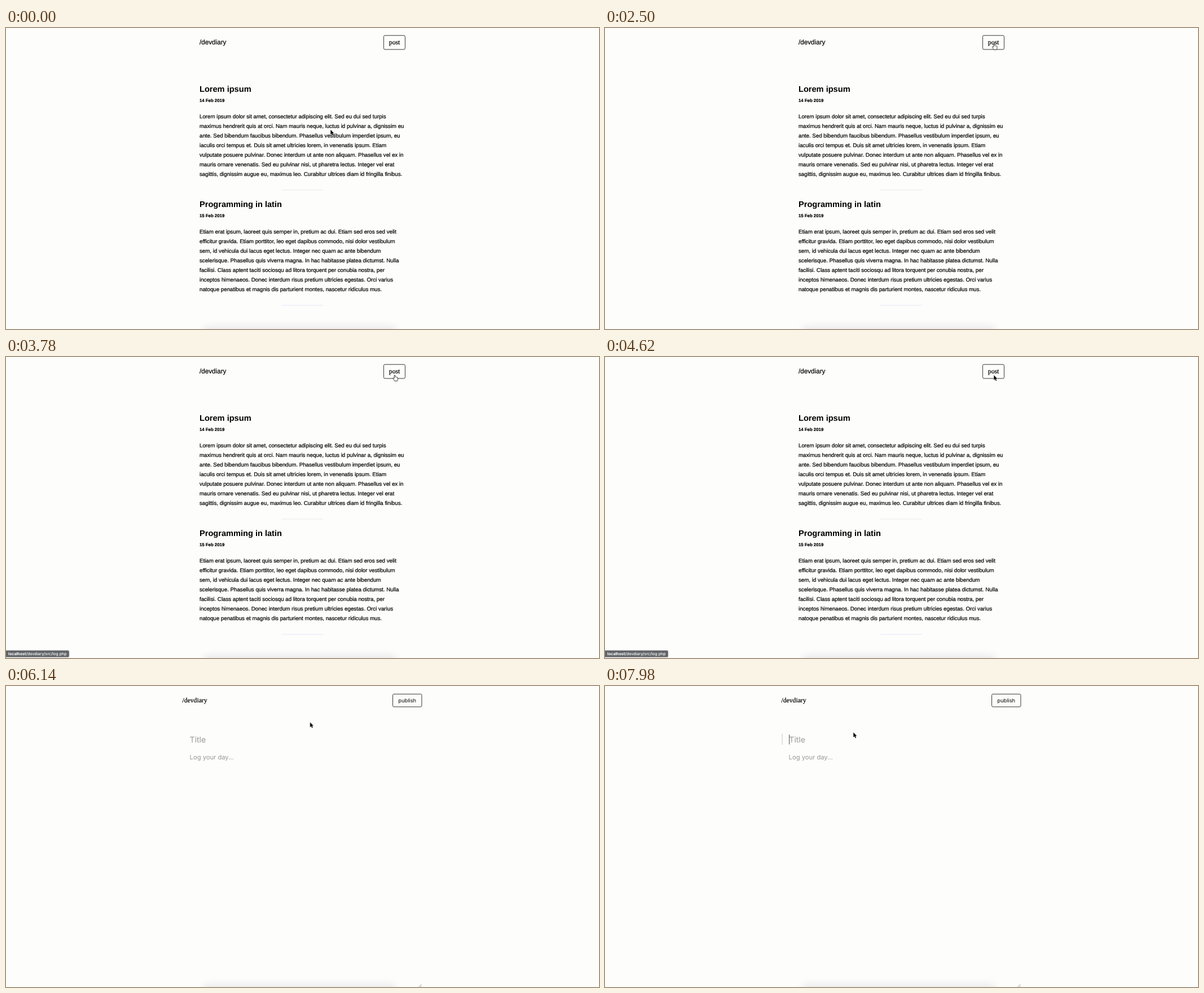
An HTML page for the animation above (8 s loop, 1051x533 px).

```html
<!DOCTYPE html>
<html lang="en">
<head>
<meta charset="utf-8">
<title>devdiary</title>
<style>
  html, body { margin: 0; width: 100%; height: 100%; overflow: hidden; background: #fdfdfc; }
  svg { display: block; width: 1051px; height: 533px; }
  text { font-family: "Liberation Sans", Arial, sans-serif; text-rendering: geometricPrecision; white-space: pre; }
  .nav { font-size: 11.68px; }
  .serif { font-family: "Liberation Serif", Times, serif; }
  .ui { font-family: Inter, sans-serif; }
  .head { font-size: 14.6px; font-weight: 700; }
  .date { font-size: 7.8px; font-weight: 700; }
  .body { font-size: 9.73px; }
  .nav, .body, .date { stroke: #000; stroke-width: .22; }
  .button { fill: none; stroke: #222; stroke-width: .9; }
  .hint { fill: #989898; }

  /* 1% of the loop is 80 ms */
  .feed, .editor, .pointer, .arrow, .hand, .beam, .status, .focus, .title {
    animation: 8s linear infinite;
  }
  .feed, .editor, .arrow, .hand, .beam, .focus, .title { animation-timing-function: step-end; }
  .feed { animation-name: feed; }
  .editor { animation-name: editor; }
  .pointer { animation-name: move; }
  .arrow { animation-name: arrow; }
  .hand { animation-name: hand; }
  .beam { animation-name: beam; }
  .status { animation-name: status; }
  .focus { animation-name: focus; }
  .title { animation-name: nudge; }

  @keyframes feed { 0% { opacity: 1 } 63%, 100% { opacity: 0 } }
  @keyframes editor { 0% { opacity: 0 } 63%, 100% { opacity: 1 } }
  @keyframes arrow { 0%, 55%, 96.25% { opacity: 1 } 20%, 80% { opacity: 0 } 100% { opacity: 1 } }
  @keyframes hand { 0%, 55%, 100% { opacity: 0 } 20% { opacity: 1 } }
  @keyframes beam { 0%, 96.25%, 100% { opacity: 0 } 80% { opacity: 1 } }
  @keyframes focus { 0% { opacity: 0 } 94%, 100% { opacity: 1 } }
  @keyframes nudge { 0% { transform: none } 94%, 100% { transform: translateX(.7px) } }
  @keyframes status {
    0%, 40.25% { opacity: 0 }
    44.5%, 65.5% { opacity: 1 }
    70%, 100% { opacity: 0 }
  }
  @keyframes move {
    0%, .25% { transform: translate(575px, 180px); animation-timing-function: ease-in-out }
    10.25% { transform: translate(692px, 23px); animation-timing-function: ease-in-out }
    14.25% { transform: translate(681px, 44px); animation-timing-function: ease-in-out }
    19.5% { transform: translate(690px, 28px) }
    21.25%, 33.5% { transform: translate(689.5px, 28px); animation-timing-function: ease-in-out }
    37% { transform: translate(694px, 23px); animation-timing-function: ease-in-out }
    41%, 70% { transform: translate(689px, 32px); animation-timing-function: ease-in }
    73.75% { transform: translate(631px, 47px) }
    76.75% { transform: translate(539px, 64px) }
    79.5% { transform: translate(452px, 81px); animation-timing-function: ease-out }
    84%, 95.75% { transform: translate(391px, 94px); animation-timing-function: ease-in-out }
    99.5%, 100% { transform: translate(440px, 82px) }
  }
</style>
</head>
<body>
<svg viewBox="0 0 1051 533">
  <defs>
    <filter id="soft" x="-20%" y="-100%" width="140%" height="300%">
      <feGaussianBlur stdDeviation="7"/>
    </filter>
  </defs>

  <g class="feed">
    <text class="nav" x="343" y="29">/devdiary</text>
    <rect class="button" x="669.4" y="13.2" width="38" height="24.8" rx="2.3"/>
    <text class="nav serif" x="678.8" y="29.3">post</text>

    <text class="head" x="343" y="112.8">Lorem ipsum</text>
    <text class="date" x="343" y="131.1">14 Feb 2019</text>
    <text class="body" y="160.1">
      <tspan x="343">Lorem ipsum dolor sit amet, consectetur adipiscing elit. Sed eu dui sed turpis</tspan>
      <tspan x="343" dy="17">maximus hendrerit quis at orci. Nam mauris neque, luctus id pulvinar a, dignissim eu</tspan>
      <tspan x="343" dy="17">ante. Sed bibendum faucibus bibendum. Phasellus vestibulum imperdiet ipsum, eu</tspan>
      <tspan x="343" dy="17">iaculis orci tempus et. Duis sit amet ultricies lorem, in venenatis ipsum. Etiam</tspan>
      <tspan x="343" dy="17">vulputate posuere pulvinar. Donec interdum ut ante non aliquam. Phasellus vel ex in</tspan>
      <tspan x="343" dy="17">mauris ornare venenatis. Sed eu pulvinar nisi, ut pharetra lectus. Integer vel erat</tspan>
      <tspan x="343" dy="17">sagittis, dignissim augue eu, maximus leo. Curabitur ultrices diam id fringilla finibus.</tspan>
    </text>
    <path d="M488 287H562" stroke="#e9e9e2"/>

    <text class="head" x="343" y="316.8">Programming in latin</text>
    <text class="date" x="343" y="335.1">15 Feb 2019</text>
    <text class="body" y="364.1">
      <tspan x="343">Etiam erat ipsum, laoreet quis semper in, pretium ac dui. Etiam sed eros sed velit</tspan>
      <tspan x="343" dy="17">efficitur gravida. Etiam porttitor, leo eget dapibus commodo, nisi dolor vestibulum</tspan>
      <tspan x="343" dy="17">sem, id vehicula dui lacus eget lectus. Integer nec quam ac ante bibendum</tspan>
      <tspan x="343" dy="17">scelerisque. Phasellus quis viverra magna. In hac habitasse platea dictumst. Nulla</tspan>
      <tspan x="343" dy="17">facilisi. Class aptent taciti sociosqu ad litora torquent per conubia nostra, per</tspan>
      <tspan x="343" dy="17">inceptos himenaeos. Donec interdum risus pretium ultricies egestas. Orci varius</tspan>
      <tspan x="343" dy="17">natoque penatibus et magnis dis parturient montes, nascetur ridiculus mus.</tspan>
    </text>
    <path d="M488 491H562" stroke="#e6e6f8"/>
  </g>

  <g class="editor">
    <text class="nav serif" x="312.5" y="29.3">/devdiary</text>
    <rect class="button" x="685.5" y="14.3" width="51.4" height="22.6" rx="2.3"/>
    <text class="ui" x="695.3" y="29.2" font-size="9.3">publish</text>
    <text class="ui hint title" x="325.6" y="100.2" font-size="14">Title</text>
    <text class="ui hint" x="325.6" y="130" font-size="11.2">Log your day...</text>
    <path d="M731.5 533L736.5 528M734.5 533L736.5 531" stroke="#888" stroke-width=".8"/>
    <g class="focus">
      <path d="M314.2 84.5V104" stroke="#c8c8c8"/>
      <path d="M326.7 86V103.5" stroke="#333" stroke-width=".9"/>
    </g>
  </g>

  <rect x="350" y="528" width="341" height="40" fill="#101030" opacity=".075" filter="url(#soft)"/>

  <g class="status">
    <rect x="-3" y="519.5" width="115" height="12.2" rx="2" fill="#626568" stroke="#cfcfcf" stroke-width=".5"/>
    <text class="ui" x="4" y="528" font-size="7" fill="#fff" font-weight="500"><tspan font-weight="700">localhost</tspan>/devdiary/src/log.php</text>
  </g>

  <g class="pointer">
    <path class="arrow" d="M.3.3V9L2.3 7.1L3.7 10.3L5.1 9.7L3.8 6.6H6.4Z" stroke="#fff" stroke-width=".8" paint-order="stroke"/>
    <path class="hand" d="M-.9.9Q-.9 0 0 0T.9.9V3.2Q1.7 2.6 2.4 3.5Q3.3 3 3.9 4Q5.4 3.7 5.4 5V7.4Q5.2 9 4.5 10.5H-.4Q-1.4 8.3-2.9 6.3Q-3.4 5.2-2.4 5Q-1.6 4.9-.9 6Z" fill="#fff" stroke="#111" stroke-width=".8"/>
    <path class="beam" d="M-2-6Q0-6 0-4.8Q0-6 2-6M0-5V5M-2 6Q0 6 0 4.8Q0 6 2 6" fill="none" stroke="#111" stroke-width=".8"/>
  </g>
</svg>
</body>
</html>
```
